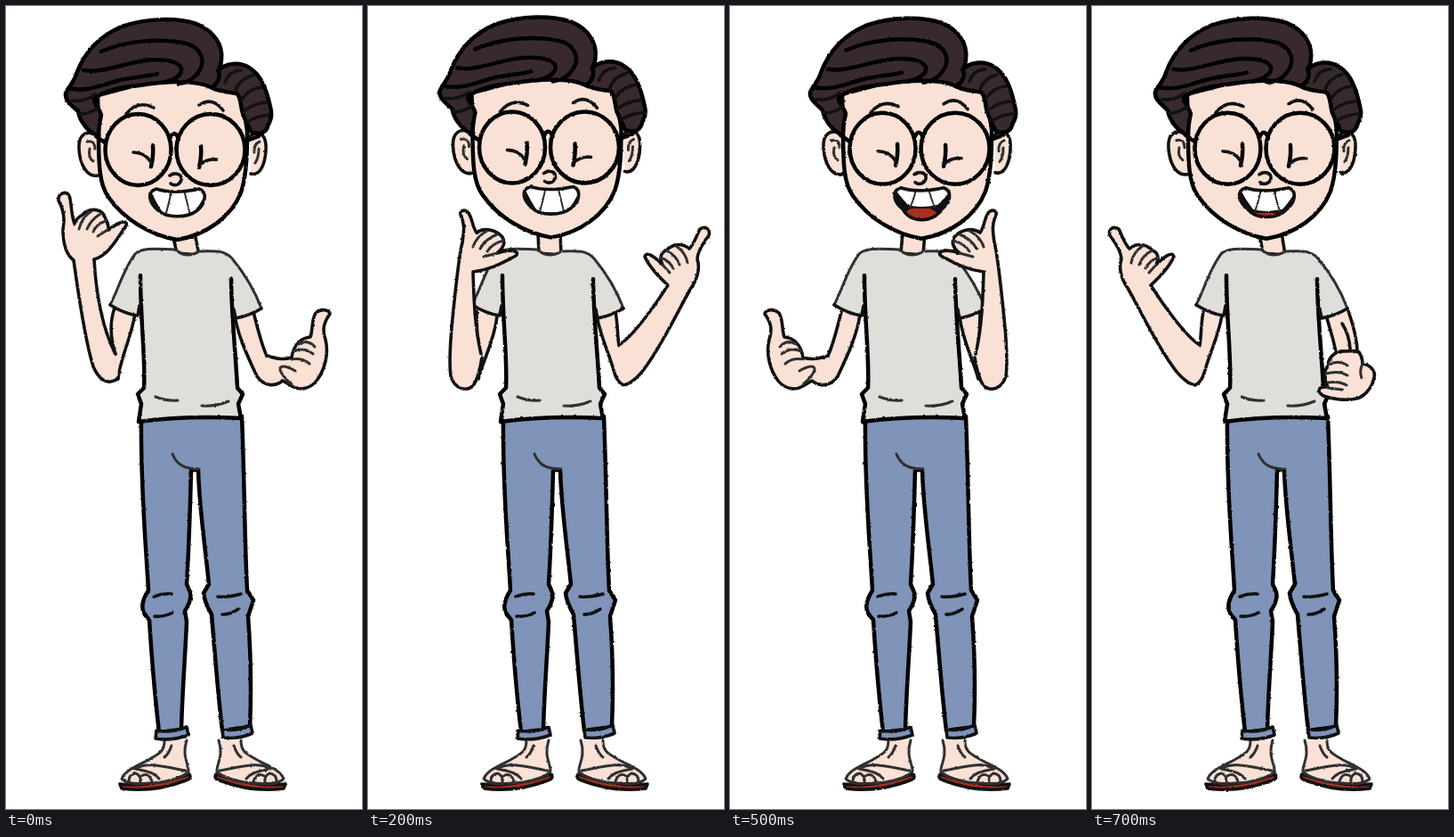
An HTML page for the animation above (0.8 s loop, 400 by 900 pixels).

```html
<!DOCTYPE html>
<html lang="en">
<head>
<meta charset="utf-8">
<title>Dancing man</title>
<style>
html, body { margin: 0; height: 100%; overflow: hidden; background: #fff; }
svg { display: block; width: 100%; height: 100%; }
path, ellipse { stroke: #111; stroke-width: 3.6; stroke-linecap: round; stroke-linejoin: round; fill: none; }
.skin { fill: #f9e1d6; }
.shirt { fill: #dfdeda; }
.jeans { fill: #8093b8; }
.hair { fill: #382a2c; }
.red { fill: #a92f20; }
.bold { stroke: #000; stroke-width: 4.5; }
.thin { stroke: #303030; stroke-width: 3; }
.bare { stroke: none; }
</style>
</head>
<body>
<svg viewBox="0 0 400 900">
<defs>
  <filter id="chalk" filterUnits="userSpaceOnUse" x="0" y="0" width="400" height="900" color-interpolation-filters="sRGB">
    <feTurbulence id="grain" type="fractalNoise" baseFrequency=".35"/>
    <feDisplacementMap in="SourceGraphic" scale="2.4" xChannelSelector="R" yChannelSelector="G"/>
  </filter>
  <clipPath id="lips"><path id="lipShape"/></clipPath>

  <!-- upper arms, behind the sleeve -->
  <path id="up0" class="skin" d="M122 338C116 356 117 372 123 390L113 405L126 418C128 395 140 375 145 345"/>
  <use id="up1" href="#up0"/>
  <path id="up2" class="skin" d="M122 342L123 385L110 400L124 418C130 395 142 375 145 348"/>
  <path id="up3" class="skin" d="M118 342C112 360 106 375 96 390L110 405L125 380L140 350"/>
  <path id="up4" class="skin" d="M115 342C108 362 105 375 105 388L128 394C130 378 135 365 139 350M122 356Q114 368 113 384"/>
  <path id="up5" class="skin" d="M125 343C120 362 116 380 110 392L105 410L121 415C133 390 142 370 146 347"/>
  <path id="up6" class="skin" d="M126 343C122 365 118 382 108 388L110 405L124 412C132 390 142 370 146 347"/>
  <path id="up7" class="skin" d="M125 343C122 358 123 370 121 380L112 400L127 408C132 390 142 370 146 347"/>

  <!-- forearms and hands, in front -->
  <g id="arm0">
    <path class="skin" d="M123 390C108 362 101 320 99 284C114 280 123 264 135 246C137 240 129 240 115 251C116 243 112 240 110 234C104 226 92 227 86 234C81 237 78 240 77 244C73 234 74 222 71 212C67 207 58 210 59 218C66 230 66 240 64 250C64 268 68 279 76 285C81 320 88 372 98 404C104 418 113 424 121 420Q125 419 126 416"/>
    <path class="thin" d="M82 250Q85 237 96 230M91 250Q95 240 106 233M98 253Q102 244 112 241M114 251Q106 256 103 258"/>
  </g>
  <use id="arm1" href="#arm0" transform="rotate(6 115 420)"/>
  <g id="arm2">
    <path class="skin" d="M127 390C120 360 119 330 118 298C140 295 152 287 166 280C172 274 158 272 145 277C154 270 154 264 151 259C145 252 132 247 122 254C117 247 118 240 113 232C109 227 103 229 104 234C110 246 107 256 106 265C102 280 99 310 95 350C92 380 91 400 93 415C98 430 110 432 118 426Q125 415 128 394"/>
    <path class="thin" d="M118 270Q122 258 134 252M126 272Q132 261 145 256M134 275Q140 266 152 263M145 277L130 281"/>
  </g>
  <g id="arm3">
    <path class="skin" d="M104 384C113 370 120 358 127 345C126 335 128 325 132 312C135 300 131 290 130 283C131 275 139 275 142 281C146 290 145 300 147 308C155 309 165 317 163 324C168 328 168 340 164 347C171 348 176 345 182 345C186 350 172 358 160 362C152 367 145 368 138 366C134 385 128 405 122 417C113 430 104 432 98 428C90 422 90 405 96 390"/>
    <path class="thin" d="M135 326Q143 315 156 319M138 338Q146 325 163 328M144 343Q152 336 164 339M164 347L150 348"/>
  </g>
  <g id="arm4">
    <path class="skin" d="M103 388Q99 394 99 401C90 402 84 410 86 416C88 428 97 438 106 440C120 443 135 440 143 437C152 431 148 426 138 427C142 419 143 410 138 403C137 392 128 386 118 387Q110 386 103 388"/>
    <path class="thin" d="M116 403Q126 396 137 402M116 414Q126 408 140 412M117 425Q126 420 138 422M138 428L122 430M99 401Q103 409 100 417"/>
  </g>
  <g id="arm5">
    <path class="skin" d="M110 392C100 395 92 397 82 394C80 380 72 372 61 371C58 362 60 352 55 344C48 338 40 341 39 345C46 355 48 362 44 374C40 390 45 408 54 420C62 430 74 431 82 426L92 420C100 426 112 428 121 415"/>
    <path class="skin thin" d="M78 409C88 403 96 402 95 408C93 414 88 419 82 424"/>
    <path class="thin" d="M56 382Q64 373 74 379M58 390Q68 382 80 387M62 401Q70 394 82 396"/>
  </g>
  <g id="arm6">
    <path class="skin" d="M108 388C95 390 75 385 60 381C68 375 77 370 77 364C72 362 65 368 57 369C61 360 59 350 53 345C48 338 42 337 35 337C36 325 34 315 32 308C28 303 20 304 19 308C24 318 26 328 23 338C15 350 12 362 16 372C22 385 40 396 60 403C80 412 100 422 112 426Q121 424 124 412"/>
    <path class="thin" d="M30 357Q34 346 45 341M36 362Q42 350 54 346M42 366Q47 358 58 355M57 369L44 374"/>
  </g>
  <g id="arm7">
    <path class="skin" d="M121 380C105 370 80 335 66 313C78 302 88 290 92 281C90 274 80 282 72 290C76 283 74 276 68 274C62 268 52 264 42 272C36 266 33 255 30 250C24 246 18 250 20 257C26 265 33 275 33 284C30 292 32 305 40 316C55 342 70 375 90 403C100 418 110 424 116 425Q124 421 127 408"/>
    <path class="thin" d="M44 288Q46 276 57 269M53 290Q57 279 68 274M60 294Q65 285 74 282M72 290L64 299"/>
  </g>

  <g id="foot">
    <path class="red" d="M128 872Q160 876 206 861Q209 866 202 868Q165 882 130 877Z"/>
    <path class="skin thin" d="M178 823C178 836 172 838 160 845C146 852 134 857 130 866C136 873 150 872 160 871C180 871 200 864 205 858C206 850 197 842 203 823"/>
    <path class="thin" d="M145 855C158 847 175 852 202 857M146 855C158 858 165 858 172 866M138 869Q138 861 146 860Q152 863 151 870M152 863Q160 858 164 869M186 829Q183 838 178 842"/>
  </g>
</defs>

<g filter="url(#chalk)">
  <use href="#foot"/>
  <use href="#foot" transform="translate(442) scale(-1 1)"/>

  <path class="jeans bold" d="M152 460C151 540 157 600 160 655Q149 672 156 682L161 688C164 735 168 780 172 814L197 811C198 770 201 735 203 690L201 678Q209 666 207 657L203 648C206 600 207 560 208 520L216 520C217 560 223 600 228 648L222 658Q223 668 231 682C235 730 239 780 243 812L274 808C276 765 275 725 272 684L278 666L271 655C268 600 268 530 265 460Z"/>
  <path class="jeans" d="M169 812Q187 815 203 808L205 817Q188 824 168 821ZM243 811Q260 813 275 806L277 815Q262 822 244 820Z"/>
  <path class="thin" d="M187 502C192 515 202 519 217 519"/>
  <path d="M166 662Q176 658 186 659M167 684Q177 685 187 680M238 662Q250 663 264 659M243 682Q252 682 261 676"/>

  <path id="neck" class="skin"/>
  <use id="upL"/>
  <g transform="translate(403) scale(-1 1)"><use id="upR"/></g>

  <path class="shirt bare" d="M190 273C165 272 152 271 145 278C132 295 126 318 117 335Q133 345 148 348L153 350C154 385 156 410 155 428L148 435L152 446L149 466Q200 459 264 462L261 446L266 435L260 428L256 345L258 350Q274 347 287 339C278 315 264 295 254 283C244 272 230 275 217 275Q203 284 190 273Z"/>
  <path class="bold" d="M151 302C151 350 157 400 155 428L148 435L152 446L149 466Q200 459 264 462L261 446L266 435L260 428C258 390 253 340 253 306"/>
  <path class="thin" d="M190 273C165 272 152 271 145 278C132 295 126 318 117 335M190 273Q203 284 217 275C230 275 244 272 254 283C264 295 278 315 287 339M168 438Q180 443 193 442M220 448Q236 449 250 443"/>
  <path d="M117 335Q133 345 148 347L150 336M287 339Q274 347 258 350L256 340"/>

  <g id="head">
    <path class="skin" d="M104 146C90 137 81 145 82 160C83 178 91 192 103 190M274 146C287 137 293 147 292 162C291 178 285 191 275 188"/>
    <path class="thin" d="M91 152Q100 150 100 160M94 160Q92 170 98 174M285 152Q278 155 279 164M284 160Q284 170 280 176"/>
    <path class="skin bold" d="M103 100L104 140C104 180 105 200 115 214C133 240 163 257 192 262C224 257 253 237 264 209C271 188 271 160 271 140L264 95L180 80Z"/>

    <path class="hair bold" d="M104 146C93 142 83 130 81 118C72 110 66 105 67 98C72 88 77 84 79 76C88 52 104 34 130 23C160 13 192 13 214 20C234 28 244 44 242 60C242 66 240 69 238 73C246 64 262 62 273 69C288 77 294 98 298 118Q299 126 295 132Q293 142 285 143L276 142C272 134 269 128 266 121C263 110 264 101 259 98C247 96 239 96 230 91C214 83 180 84 150 89C128 91 108 96 99 104C98 110 105 114 107 122Q104 135 104 146Z"/>
    <path class="bold" d="M107 51C135 39 170 36 198 41C220 45 226 62 215 76Q207 86 194 87M87 72C114 77 145 56 180 61C204 64 203 80 176 86M70 92C92 97 108 88 128 83C146 79 160 79 170 76M239 72Q242 85 231 91"/>
    <path d="M74 106Q88 108 100 99M82 121Q92 122 104 114M246 86Q250 73 264 72M258 95Q262 82 277 78M265 105Q272 93 287 91M267 118Q278 109 293 108M271 130Q282 123 296 122"/>

    <path d="M135 121Q148 105 166 114M217 111Q232 101 244 117"/>
    <ellipse class="bold" cx="148.500" cy="161" rx="37" ry="40"/>
    <ellipse class="bold" cx="230" cy="161" rx="38.500" ry="40"/>
    <path class="bold" d="M184 149Q189 137 194 149M111 153L101 146M268 152L284 146"/>
    <path class="bold" d="M165 156Q166 168 163 180M219 157Q220 168 217 181"/>
    <path d="M143 164Q156 164 163 175M218 178Q225 171 237 172"/>
    <path d="M184 190C190 186 198 188 197 195C195 201 189 202 185 199"/>

    <g clip-path="url(#lips)">
      <path style="fill:#111" d="M155 200H230V248H155Z"/>
      <ellipse id="tongue" class="red bare" cx="191" rx="19" ry="9"/>
      <path id="teeth" style="fill:#fff;stroke-width:2.200"/>
      <path id="gaps" class="thin" style="stroke-width:2"/>
    </g>
    <path id="rim"/>
  </g>

  <use id="armL"/>
  <g transform="translate(403) scale(-1 1)"><use id="armR"/></g>
</g>
</svg>
<script>
const $ = id => document.getElementById(id);
const set = (id, name, value) => $(id).setAttribute(name, value);
const STEPS = 8, STEP_MS = 100;
const openness = [0, 0, 0, .45, .8, 1, 1, .4];

function drawMouth(o) {
  const low = 238 + 7 * o, bite = 233 - 8 * o;
  const lips = `M169 205C184 210 203 208 217 205C${227 + o} 209 224 222 215 229C204 ${low} 180 ${low} 171 229C160 220 158 208 169 205Z`;
  set('lipShape', 'd', lips);
  set('rim', 'd', lips);
  set('teeth', 'd', `M158 200L229 200C224 215 217 ${bite - 7} 211 ${bite}Q190 ${bite + 5} 176 ${bite}C169 ${bite - 9} 165 215 158 200Z`);
  set('gaps', 'd', `M186 206Q184 218 179 ${bite + 2}M200 206Q203 218 207 ${bite + 2}`);
  set('tongue', 'cy', 245 - 9 * o);
}

function pose(step) {
  const a = step / STEPS * 2 * Math.PI;
  const dx = 13.5 * (1 - Math.cos(a)), dy = -2.6 * Math.sin(a) ** 2;
  const lean = .3 * dx;
  set('head', 'transform', `translate(${dx} ${dy})`);
  set('neck', 'd', `M${187 + lean} 255L192 277L217 279L${212 + lean} 255`);
  drawMouth(openness[step]);

  // the right arm mirrors the left one, five steps ahead
  const other = (step + 5) % STEPS;
  set('upL', 'href', '#up' + step);
  set('armL', 'href', '#arm' + step);
  set('upR', 'href', '#up' + other);
  set('armR', 'href', '#arm' + other);
  set('grain', 'seed', 1 + step % 3);
}

let last = -1;
function tick() {
  const step = Math.floor(performance.now() / STEP_MS) % STEPS;
  if (step !== last) pose(last = step);
  requestAnimationFrame(tick);
}
tick();
</script>
</body>
</html>
```
